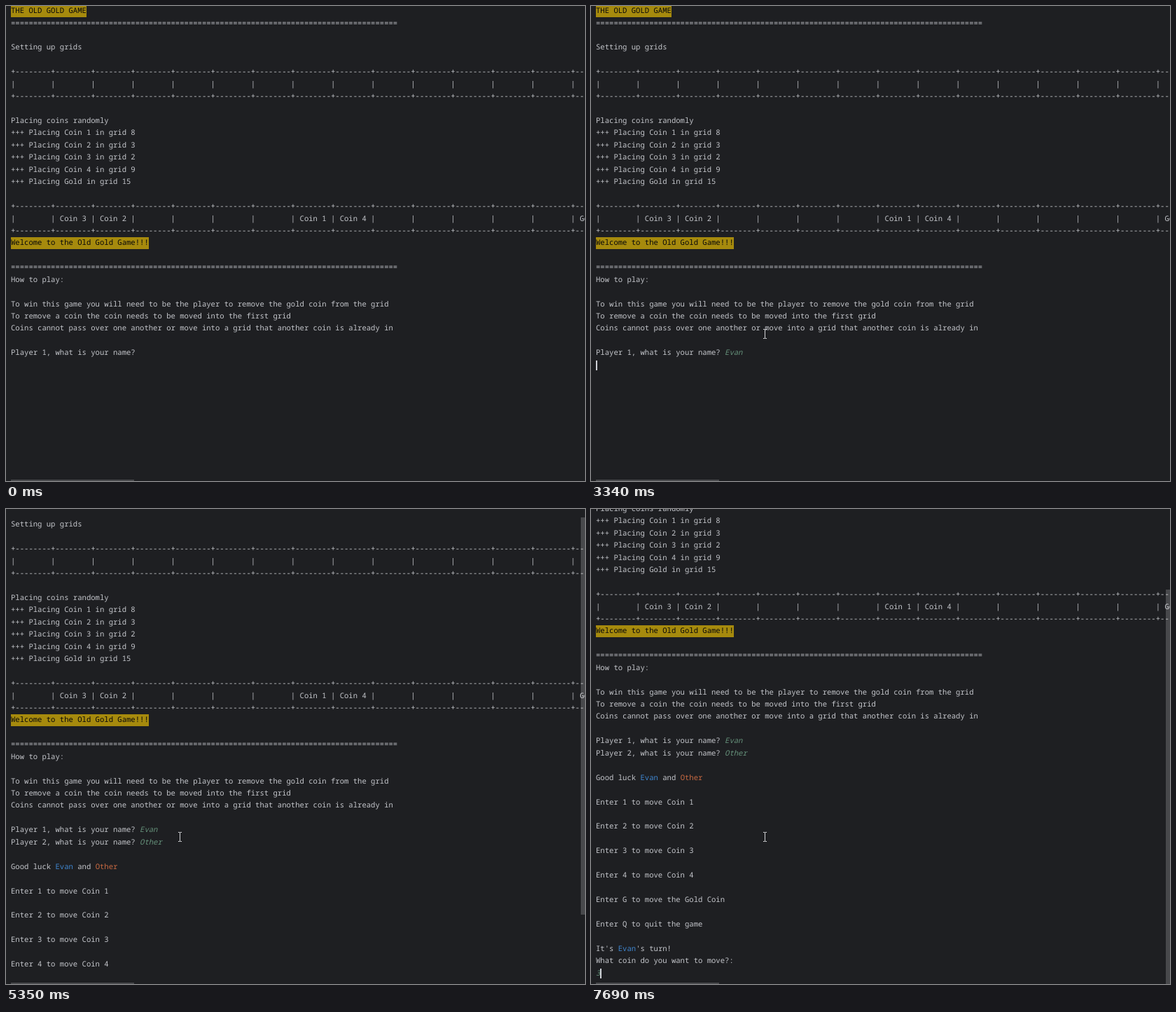
These frames come from a looping animation (827 px wide and 678 px high, 8 s). An HTML page:

```html
<!DOCTYPE html>
<html lang="en">
<head>
<meta charset="utf-8">
<title>Old Gold Game console</title>
<style>
  html, body { margin: 0; width: 100%; height: 100%; overflow: hidden; background: #1e1f22; }
  #stage { position: relative; width: 827px; height: 678px; overflow: hidden; background: #1e1f22; }
  #stage > * { position: absolute; }
  #console {
    left: 7px; margin: 0; white-space: pre; color: #c4c6cb;
    font: 500 10.585px/17.44px "Noto Sans Mono", "DejaVu Sans Mono", monospace;
    font-variant-ligatures: none; text-rendering: geometricPrecision;
  }
  #console div { height: 17.44px; }
  .title { display: inline-block; height: 17px; background: #a68a0d; color: #08080a; }
  .input { color: #65917a; font-style: italic; }
  .one { color: #3f86cf; }
  .two { color: #c96a42; }
  #caret { width: 2px; height: 14.5px; background: #ced0d6; }
  .bar { background: rgba(255, 255, 255, .19); }
  #hbar { left: 7px; top: 675.5px; width: 176px; height: 3px; }
  #vbar { left: 821px; width: 6px; height: 567px; }
  #pointer { left: 0; top: 0; fill: none; stroke: #d4d5d8; }
</style>
</head>
<body>
<div id="stage">
  <pre id="console"></pre>
  <div id="caret"></div>
  <svg id="pointer" width="7" height="14"><path d="M1 .5h2l.5 .5l.5 -.5h2M3.5 1v12M1 13.5h2l.5 -.5l.5 .5h2"/></svg>
  <div id="hbar" class="bar"></div>
  <div id="vbar" class="bar"></div>
</div>
<script>
const LOOP = 8000, ROW = 17.44, COLUMN = 6.34;
const $ = id => document.getElementById(id);
const span = (kind, text) => `<span class="${kind}">${text}</span>`;

const first = { name: "Evan", keys: [2010, 2280, 2410, 2610], row: 28 };
const second = { name: "Other", keys: [4150, 4480, 4680, 4880, 5080], row: 29 };
const ENTER_FIRST = 3340, ASK_SECOND = 3540, ENTER_SECOND = 5350, SETTLED = 5420, MOVE_KEY = 7690;
const caretOn = [[940, 1480], [1940, ENTER_SECOND], [SETTLED, 6030], [6550, 7020], [7560, LOOP]];

// Pointer stops: time, x, y of the I-beam centre
const stops = [
  [200, 736, 645], [270, 625, 572], [340, 490, 500], [400, 350, 451], [470, 245, 434],
  [540, 185, 445], [600, 168, 470], [670, 187, 490], [740, 218, 499],
  [1010, 225, 495], [1080, 237, 487], [1140, 246, 478], [1210, 251, 470], [1340, 248, 467.5]
];

const rule = "=".repeat(87);
const border = "+--------".repeat(15) + "+";
const grid = cells => [
  border,
  Array.from({ length: 15 }, (_, i) => "| " + (cells[i + 1] || "").padEnd(7)).join("") + "|",
  border
];
const placed = ["Coin 1 in grid 8", "Coin 2 in grid 3", "Coin 3 in grid 2", "Coin 4 in grid 9", "Gold in grid 15"];
const intro = [
  span("title", "THE OLD GOLD GAME"), rule, "", "Setting up grids", "",
  ...grid({}), "",
  "Placing coins randomly", ...placed.map(p => "+++ Placing " + p), "",
  ...grid({ 2: "Coin 3", 3: "Coin 2", 8: "Coin 1", 9: "Coin 4", 15: "Gold" }),
  span("title", "Welcome to the Old Gold Game!!!"), "", rule,
  "How to play:", "",
  "To win this game you will need to be the player to remove the gold coin from the grid",
  "To remove a coin the coin needs to be moved into the first grid",
  "Coins cannot pass over one another or move into a grid that another coin is already in", ""
];
const blue = span("one", first.name), orange = span("two", second.name);
const menu = [
  "", `Good luck ${blue} and ${orange}`, "",
  ...[1, 2, 3, 4].flatMap(n => [`Enter ${n} to move Coin ${n}`, ""]),
  "Enter G to move the Gold Coin", "", "Enter Q to quit the game", "",
  `It's ${blue}'s turn!`, "What coin do you want to move?:"
];

const typed = (player, t) => player.name.slice(0, player.keys.filter(k => k <= t).length);
const ask = (n, player, t) => `Player ${n}, what is your name? ` + span("input", typed(player, t));

function linesAt(t) {
  const lines = [...intro, ask(1, first, t)];
  if (t >= ASK_SECOND) lines.push(ask(2, second, t));
  if (t >= ENTER_SECOND) lines.push(...menu);
  if (t >= MOVE_KEY) lines.push(span("input", "3"));
  return lines;
}

function caretAt(t) {
  if (t < ENTER_FIRST) return [29 + typed(first, t).length, first.row];
  if (t < ASK_SECOND) return [0, second.row];
  if (t < ENTER_SECOND) return [29 + typed(second, t).length, second.row];
  return [t < MOVE_KEY ? 0 : 1, 47];
}

let shown = "";
function render(t) {
  const html = linesAt(t).map(line => `<div>${line}</div>`).join("");
  if (html !== shown) $("console").innerHTML = shown = html;

  const scroll = t < ENTER_SECOND ? 0 : t < SETTLED ? 37 : 164;
  $("console").style.top = -0.9 - scroll + "px";
  $("vbar").style.display = scroll ? "" : "none";
  $("vbar").style.top = (t < SETTLED ? 12 : 115) + "px";

  const [column, row] = caretAt(t);
  const caret = $("caret").style;
  caret.display = caretOn.some(([from, to]) => t >= from && t < to) ? "" : "none";
  caret.left = 7 + Math.floor(column * COLUMN) + "px";
  caret.top = row * ROW - scroll + "px";

  const stop = stops.filter(s => s[0] <= t).pop();
  const pointer = $("pointer").style;
  pointer.display = stop ? "" : "none";
  if (stop) {
    pointer.left = stop[1] - 3 + "px";
    pointer.top = Math.round(stop[2] - 7) + "px";
  }
}

const start = performance.now();
function tick() {
  render((performance.now() - start) % LOOP);
  requestAnimationFrame(tick);
}
tick();
</script>
</body>
</html>
```
